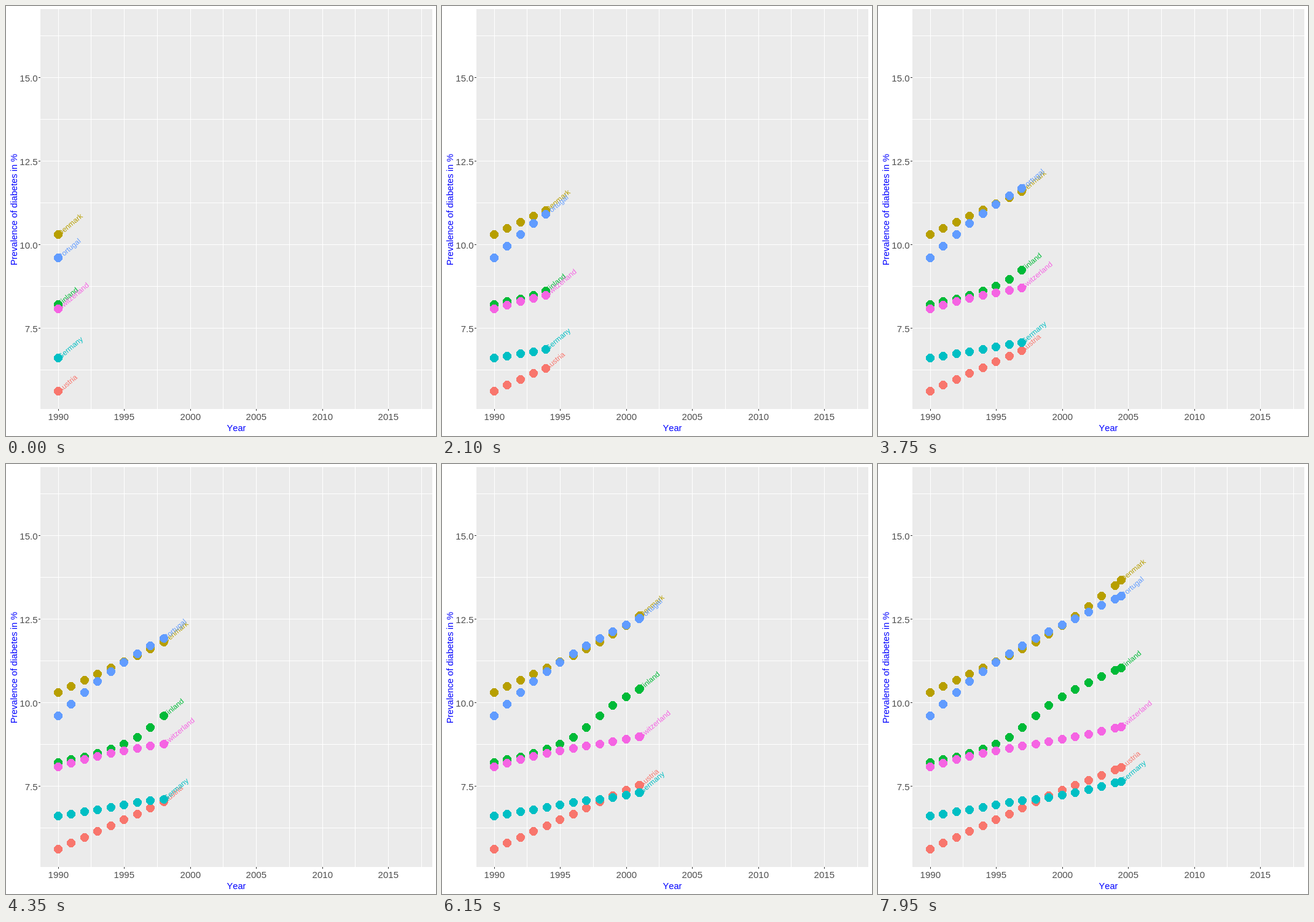
These frames come from a looping animation (700x700 px, 8 s). An HTML page:

```html
<!DOCTYPE html>
<html lang="en">
<head>
<meta charset="utf-8">
<title>Prevalence of diabetes by year</title>
<style>
  html, body { margin: 0; width: 100%; height: 100%; overflow: hidden; background: #fff; }
  svg { display: block; width: 100%; height: 100%; }
  text { font-family: "Liberation Sans", Arial, sans-serif; font-kerning: none; }
  .tick { font-size: 15px; fill: #4d4d4d; }
  .title { font-size: 14.67px; fill: #00f; text-anchor: middle; }
  .label { font-size: 12px; }
  .crisp { shape-rendering: crispEdges; }
</style>
</head>
<body>
<svg id="chart" viewBox="0 0 700 700"></svg>
<script>
const LOOP = 8000, STEP = 150;
const YEAR_W = 21.5, YEAR_X = 85;
const FRAMES_PER_YEAR = 99 / 27;
const LAST_YEAR = 15, KEY_GAP = 3;

// Each curve is a spline through one height every KEY_GAP years
const series = [
  { name: 'Austria', color: '#F8766D', keys: [627, 598, 570, 540, 515, 490] },
  { name: 'Denmark', color: '#B79F00', keys: [372, 342, 312, 277, 232, 180] },
  { name: 'Finland', color: '#00BA38', keys: [486, 471, 445, 393, 356, 327] },
  { name: 'Germany', color: '#00BFC4', keys: [573, 563, 551, 543, 530, 514] },
  { name: 'Portugal', color: '#619CFF', keys: [410, 354, 309, 273, 241, 209] },
  { name: 'Switzerland', color: '#F564E3', keys: [493, 476, 463, 452, 440, 425] }
];

const svg = document.getElementById('chart');

function add(parent, tag, attrs, text) {
  const el = document.createElementNS('http://www.w3.org/2000/svg', tag);
  for (const key in attrs) el.setAttribute(key, attrs[key]);
  if (text) el.textContent = text;
  parent.appendChild(el);
  return el;
}

const box = (x, y, width, height, fill) =>
  add(svg, 'rect', { x, y, width, height, fill, class: 'crisp' });

const xAt = year => Math.floor(YEAR_X + YEAR_W * year);
const frameOf = year => Math.round(year * FRAMES_PER_YEAR);
const ease = t => t < 0.5 ? 4 * t ** 3 : 1 - 4 * (1 - t) ** 3;
const mix = (a, b, t) => a + (b - a) * t;

// Catmull-Rom spline with straight ends
function spline(keys, pos) {
  const i = Math.min(Math.floor(pos), keys.length - 2);
  const t = pos - i;
  const a = keys[i], b = keys[i + 1];
  const before = keys[i - 1] ?? 2 * a - b;
  const after = keys[i + 2] ?? 2 * b - a;
  const m = (b - before) / 2, n = (after - a) / 2;
  return a + t * (m + t * (3 * (b - a) - 2 * m - n + t * (2 * (a - b) + m + n)));
}

function drawAxes() {
  box(56, 5, 638, 651, '#ebebeb');
  for (let i = 0; i < 12; i++) box(xAt(i * 2.5), 5, 1, 651, '#fff');
  for (let i = 0; i < 9; i++) box(56, 48 + 68 * i, 638, 1, '#fff');

  for (let i = 0; i < 6; i++) {
    const x = xAt(i * 5);
    box(x, 656, 1, 3, '#333');
    add(svg, 'text', { x: x + 0.3, y: 674, class: 'tick', 'text-anchor': 'middle' }, String(1990 + i * 5));
  }
  for (let i = 0; i < 4; i++) {
    const y = 116 + 136 * i;
    box(53, y, 3, 1, '#333');
    add(svg, 'text', { x: 51.5, y: y + 7, class: 'tick', 'text-anchor': 'end' }, (15 - i * 2.5).toFixed(1));
  }
  add(svg, 'text', { x: 375, y: 692, class: 'title' }, 'Year');
  add(svg, 'text', { transform: 'translate(18 331.5) rotate(-90)', class: 'title' },
    'Prevalence of diabetes in %');
}

function drawSeries() {
  const labels = add(svg, 'g', { class: 'label' });
  const dots = add(svg, 'g', { class: 'crisp' });
  for (const s of series) {
    const dot = (cx, cy) => add(dots, 'circle', { cx, cy, r: 7, fill: s.color });
    s.label = add(labels, 'text', { x: 0.8, y: 4.1, fill: s.color }, s.name);
    s.ys = Array.from({ length: LAST_YEAR + 1 }, (_, year) => Math.round(spline(s.keys, year / KEY_GAP)));
    s.past = s.ys.map((y, year) => dot(xAt(year), y));
    s.head = dot(0, 0);
  }
}

function render(time) {
  const frame = Math.floor((time % LOOP) / STEP);
  let year = 0;
  while (frameOf(year + 1) <= frame) year++;
  const start = frameOf(year);
  const part = ease((frame - start) / (frameOf(year + 1) - start));
  const x = xAt(year + part);

  for (const s of series) {
    const y = Math.round(mix(s.ys[year], s.ys[year + 1], part));
    s.past.forEach((dot, i) => dot.setAttribute('visibility', i <= year ? 'visible' : 'hidden'));
    s.head.setAttribute('cx', x);
    s.head.setAttribute('cy', y);
    s.label.setAttribute('transform', `translate(${x} ${y}) rotate(-40)`);
  }
}

drawAxes();
drawSeries();

let origin;
function tick(now) {
  origin ??= now;
  render(Math.max(0, now - origin));
  requestAnimationFrame(tick);
}
render(0);
requestAnimationFrame(tick);
</script>
</body>
</html>
```
